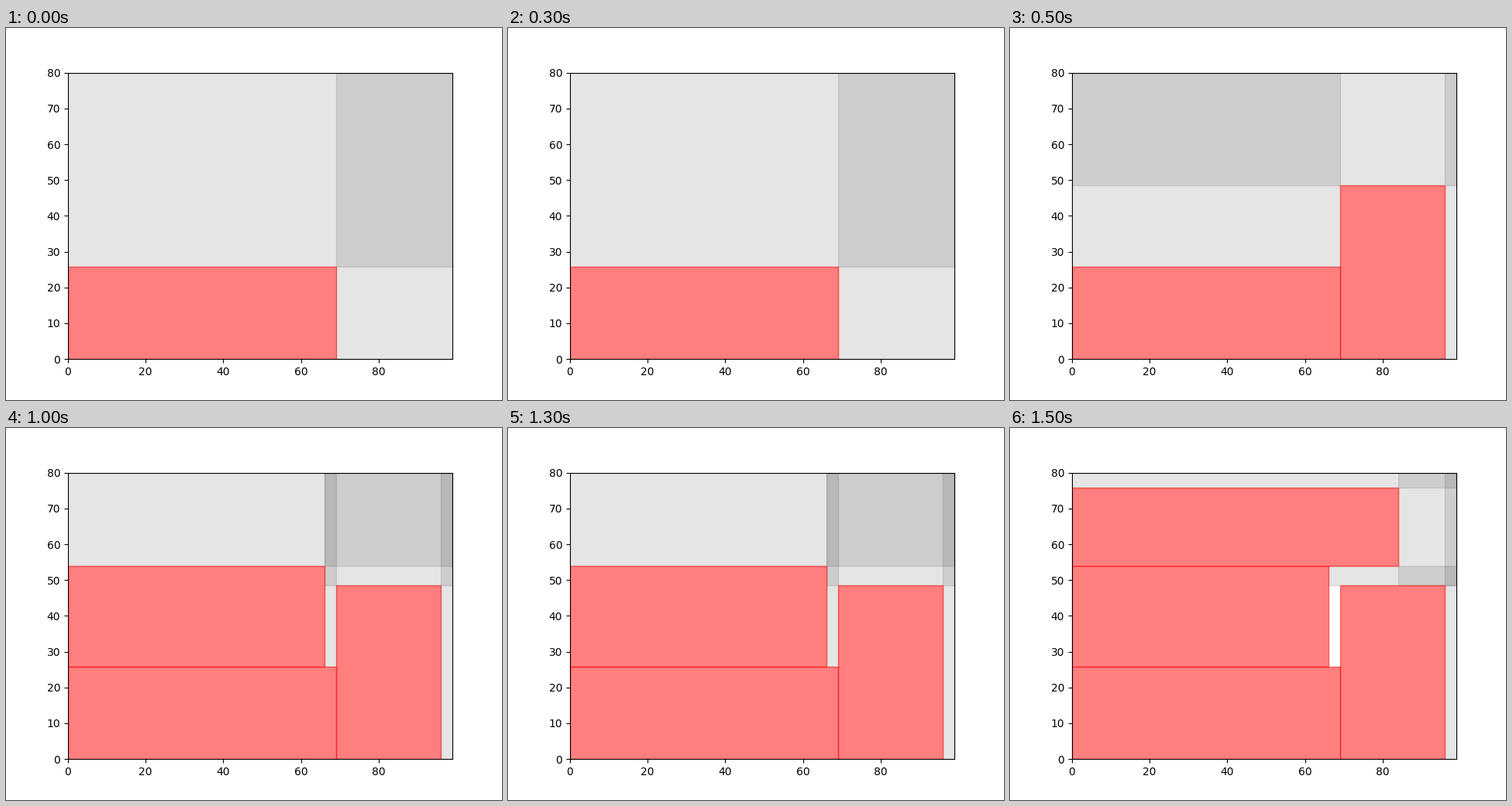
Recreate the animation shown at these times as a matplotlib script. Size 640 by 480 pixels, loop 2 s.

```python
import matplotlib.pyplot as plt
from matplotlib.animation import FuncAnimation
from matplotlib.patches import Rectangle

W, H = 99, 80

# Boxes are (left, bottom, right, top); one is packed per step.
PACKED = [
    (0, 0, 69, 25.8),
    (69, 0, 96, 48.5),
    (0, 25.8, 66, 53.95),
    (0, 53.95, 84, 75.8),
]

# Overlapping free spaces left after each step.
FREE = [
    [(69, 0, W, H), (0, 25.8, W, H)],
    [(0, 48.5, W, H), (0, 25.8, 69, H), (96, 0, W, H)],
    [(0, 53.95, W, H), (66, 48.5, W, H), (96, 0, W, H), (66, 25.8, 69, H)],
    [(0, 75.8, W, H), (84, 48.5, W, H), (66, 48.5, W, 53.95), (96, 0, W, H)],
]

fig, ax = plt.subplots(figsize=(6.4, 4.8), dpi=100)
ax.set_xlim(0, W)
ax.set_ylim(0, H)


def add_box(box, color, alpha):
    left, bottom, right, top = box
    ax.add_patch(Rectangle((left, bottom), right - left, top - bottom,
                           color=color, alpha=alpha))


def draw(step):
    for patch in list(ax.patches):
        patch.remove()
    for box in FREE[step]:
        add_box(box, "black", 0.1)
    for box in PACKED[:step + 1]:
        add_box(box, "red", 0.5)
    return ax.patches


anim = FuncAnimation(fig, draw, frames=len(PACKED), init_func=lambda: draw(0),
                     interval=500, repeat=True, repeat_delay=0)
plt.show()
```
